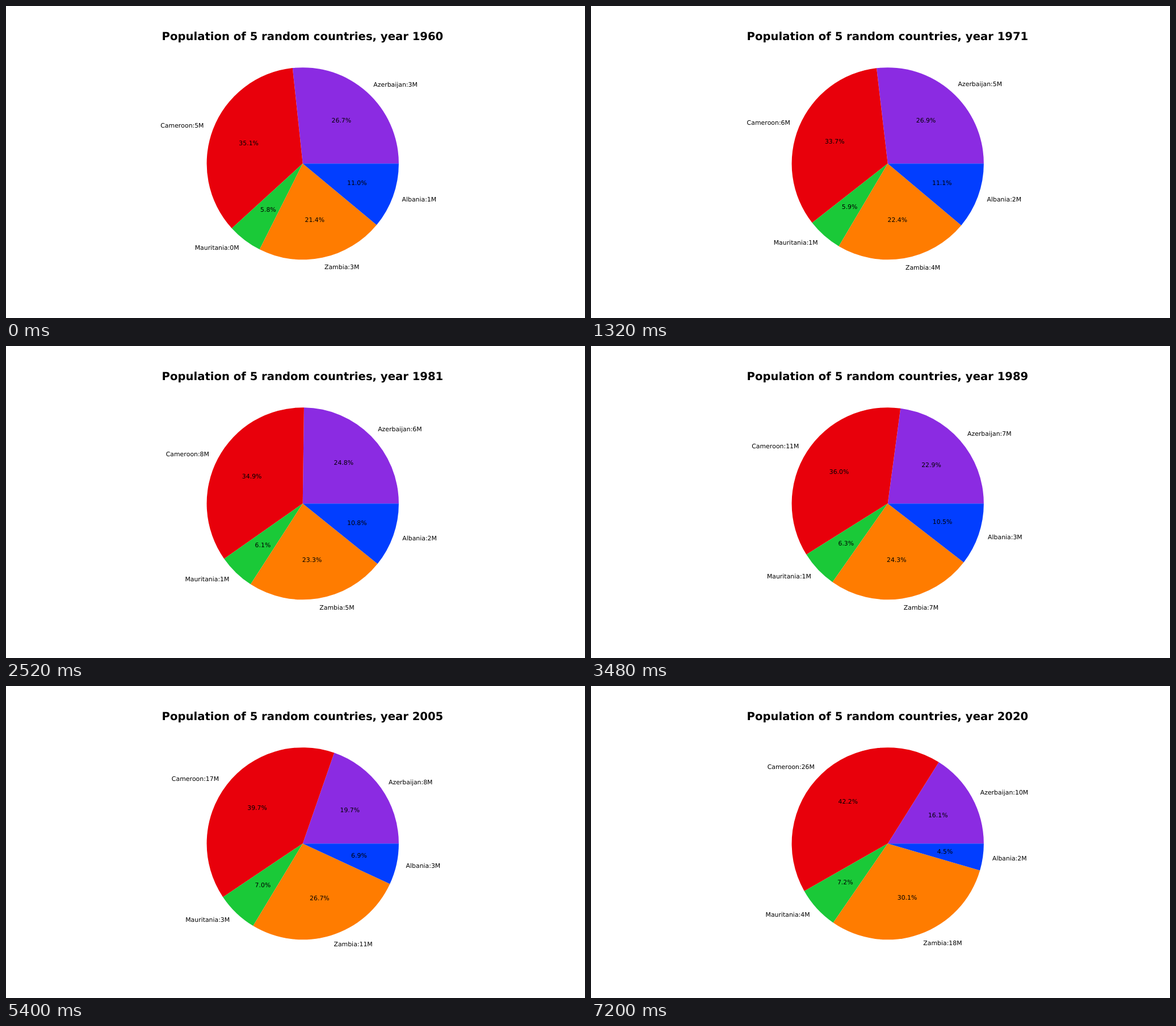
Animation of 1020x549 px, one loop 7.32 s. Source, as an HTML page:

```html
<!DOCTYPE html>
<html lang="en">
<head>
<meta charset="utf-8">
<title>Population pie</title>
<style>
  html, body { margin: 0; width: 100%; height: 100%; overflow: hidden; background: #fff; }
  svg { display: block; width: 100%; height: 100%; }
  text {
    font: 13.889px "DejaVu Sans", sans-serif;
    font-kerning: none;
    text-rendering: geometricPrecision;
  }
  #title { font-size: 25px; font-weight: bold; }
</style>
</head>
<body>
<svg viewBox="0 0 1300 700" preserveAspectRatio="none">
  <g id="slices"></g>
  <!-- the tiny turn keeps baselines from snapping to whole pixels -->
  <g id="labels" transform="rotate(0.002)">
    <text id="title" y="76"></text>
  </g>
</svg>
<script>
const STEP = 120, FIRST = 1960, LAST = 2020;
const CX = 666.25, CY = 353.5, R = 215.6;
const BASELINE = 4; // from the middle of a line down to its baseline

// Millions of people at the start of each decade; growth is steady in between.
const COUNTRIES = [
  { name: 'Azerbaijan', color: '#8b2be2', pop: [3.895, 5.195, 6.13, 7.13, 8.09, 9.08, 10.11] },
  { name: 'Cameroon', color: '#e8000b', pop: [5.12, 6.45, 8.52, 11.39, 15.09, 19.82, 26.52] },
  { name: 'Mauritania', color: '#1ac938', pop: [0.849, 1.13, 1.495, 2, 2.69, 3.42, 4.499] },
  { name: 'Zambia', color: '#ff7c00', pop: [3.12, 4.28, 5.685, 7.68, 9.8, 13.84, 18.928] },
  { name: 'Albania', color: '#023eff', pop: [1.609, 2.14, 2.65, 3.287, 3.08, 2.925, 2.838] }
];

function add(tag, parent) {
  const node = document.createElementNS('http://www.w3.org/2000/svg', tag);
  return document.getElementById(parent).appendChild(node);
}

for (const c of COUNTRIES) {
  c.slice = add('path', 'slices');
  c.slice.setAttribute('fill', c.color);
  c.label = add('text', 'labels');
  c.percent = add('text', 'labels');
}
const title = document.getElementById('title');

function population(pop, year) {
  const decades = (year - FIRST) / 10;
  const i = Math.min(Math.floor(decades), pop.length - 2);
  return pop[i] * Math.pow(pop[i + 1] / pop[i], decades - i);
}

function point(turn, r) {
  const a = turn * 2 * Math.PI;
  return [CX + r * Math.cos(a), CY - r * Math.sin(a)];
}

// align: 0 = left, 0.5 = centre, 1 = right; text sits on whole units
function place(node, text, x, y, align) {
  node.textContent = text;
  node.setAttribute('x', Math.round(x - align * node.getComputedTextLength()));
  node.setAttribute('y', Math.round(y));
}

function draw(year) {
  const pops = COUNTRIES.map(c => population(c.pop, year));
  const total = pops.reduce((a, b) => a + b, 0);
  let from = 0;
  COUNTRIES.forEach((c, i) => {
    const share = pops[i] / total;
    const to = from + share, mid = from + share / 2;
    c.slice.setAttribute('d',
      `M${CX},${CY}L${point(from, R)}A${R},${R} 0 0 0 ${point(to, R)}Z`);
    const [lx, ly] = point(mid, 1.1 * R);
    const [px, py] = point(mid, 0.6 * R);
    place(c.label, `${c.name}:${Math.floor(pops[i])}M`, lx, ly + BASELINE, lx > CX ? 0 : 1);
    place(c.percent, `${(share * 100).toFixed(1)}%`, px, py + BASELINE, 0.5);
    from = to;
  });
  place(title, `Population of 5 random countries, year ${year}`, CX, 76, 0.5);
}

const start = performance.now();
let shown = 0;
function tick() {
  const step = Math.floor((performance.now() - start) / STEP);
  const year = FIRST + step % (LAST - FIRST + 1);
  if (year !== shown) draw(shown = year);
  requestAnimationFrame(tick);
}
tick();
</script>
</body>
</html>
```
